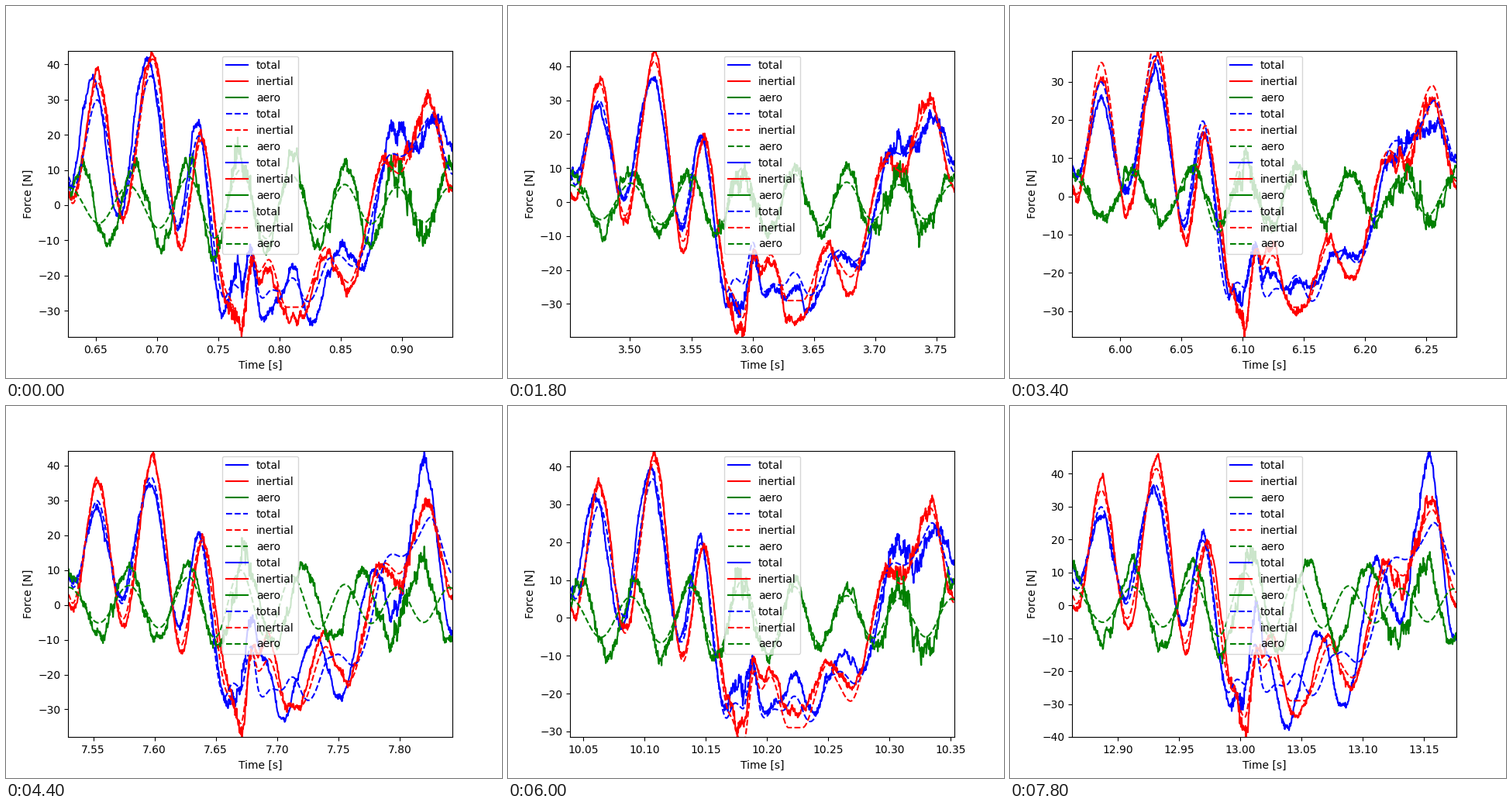
Recreate the animation shown at these times as a matplotlib script. Size 640 by 480 pixels, loop 8 s.

```python
import numpy as np
import matplotlib.pyplot as plt
from matplotlib.animation import FuncAnimation

FRAMES = 40
PERIOD = 16 / 51          # seconds in one flapping cycle
SPAN = 496                # positions run from 0 to SPAN over a cycle
SAMPLES = 1000
BEAT = 155                # where all aerodynamic ripples line up
COLORS = ("blue", "red", "green")
NAMES = ("total", "inertial", "aero")

# Turning points of the inertial force over one cycle: (position, force)
TURNS = [(0, 3), (6, 0.5), (38, 35), (71, -4), (109, 41.5), (146, -11.5),
         (172, 18.5), (203, -24), (210, -27), (223, -34), (238, -14),
         (246, -19), (259, -15.5), (282, -29), (300, -29), (333, -12),
         (344, -16.5), (362, -22), (409, 12), (427, 9), (465, 29), (496, 4)]

# Cycle, mood (+ quick ripple, - slow ripple), lowest and highest force
KEYS = [(0, 1, -37.5, 43.9), (5, -0.9, -37.6, 44.7), (13, 1.3, -41.9, 44.5),
        (17, -0.1, -36.8, 38.1), (22, -1, -37.95, 44.3),
        (30, 0.8, -31.5, 44.2), (39, -1.6, -40.05, 47)]


def bump(center, width):
    return np.exp(-((pos - center) / width) ** 2)


def curve(points, x):
    """Monotone cubic through the given turning points."""
    px, py = np.array(points, float).T
    h = np.diff(px)
    d = np.diff(py) / h
    slope = np.zeros_like(px)
    a, b = d[:-1], d[1:]
    same = a * b > 0
    slope[1:-1][same] = 2 * (a * b)[same] / (a + b)[same]
    i = np.clip(np.searchsorted(px, x, side="right") - 1, 0, len(h) - 1)
    u = (x - px[i]) / h[i]
    return (py[i] * (1 + 2 * u) * (1 - u) ** 2 + py[i + 1] * u * u * (3 - 2 * u)
            + h[i] * u * (1 - u) * (slope[i] * (1 - u) - slope[i + 1] * u))


def ripple(mood):
    """Unit aerodynamic wave; mood sets its wavelength on either side."""
    before = 77 - 8 * np.clip(mood, 0, 1)
    after = 67.5 + 7.5 * np.clip(-mood, 0, 1)
    wavelength = np.where(pos < BEAT, before, after)
    return np.cos(2 * np.pi * (pos - BEAT) / wavelength)


def jitter(rng):
    kernel = np.hanning(21)
    kernel /= np.sqrt((kernel ** 2).sum())
    slow = np.convolve(rng.normal(size=SAMPLES + 20), kernel, "valid")
    return rough * (0.5 * rng.normal(size=SAMPLES) + 0.75 * slow)


def measured(k):
    frames, *tracks = zip(*KEYS)
    mood, low, high = (np.interp(k, frames, track) for track in tracks)
    rng = np.random.default_rng(100 + k)
    inertial = model_inertial - (0.2 - 0.3 * mood) * model_aero
    total = inertial + (7 + abs(mood) * (3 + 3 * middle)) * ripple(mood)
    pair = np.array([total + jitter(rng), inertial + jitter(rng)])
    pair *= np.where(pair > 0, high / pair.max(), low / pair.min())
    return (*pair, pair[0] - pair[1]), low, high


pos = np.linspace(0, SPAN, SAMPLES)
middle = bump(225, 100)
rough = 1 + 1.6 * bump(222, 16) + 1.5 * bump(436, 30)
model_inertial = curve(TURNS, pos)
model_aero = (5 + 5 * middle) * ripple(0)
model = (model_inertial + model_aero, model_inertial, model_aero)

fig, ax = plt.subplots(figsize=(6.4, 4.8), dpi=100)
solid = [ax.plot([], [], c, label=n)[0] for c, n in zip(COLORS, NAMES)]
dashed = [ax.plot([], [], c, ls="--", label=n)[0] for c, n in zip(COLORS, NAMES)]
ax.set_xlabel("Time [s]")
ax.set_ylabel("Force [N]")
ax.legend(handles=(solid + dashed) * 2, loc="upper center")


def update(k):
    start = (k + 2) * PERIOD
    t = start + pos / SPAN * PERIOD
    forces, low, high = measured(k)
    for line, force in zip(solid + dashed, (*forces, *model)):
        line.set_data(t, force)
    ax.set_xlim(start, start + PERIOD)
    ax.set_ylim(low, high)
    return solid + dashed


anim = FuncAnimation(fig, update, frames=FRAMES, interval=200,
                     repeat=True, repeat_delay=0, blit=False)
plt.show()
```
